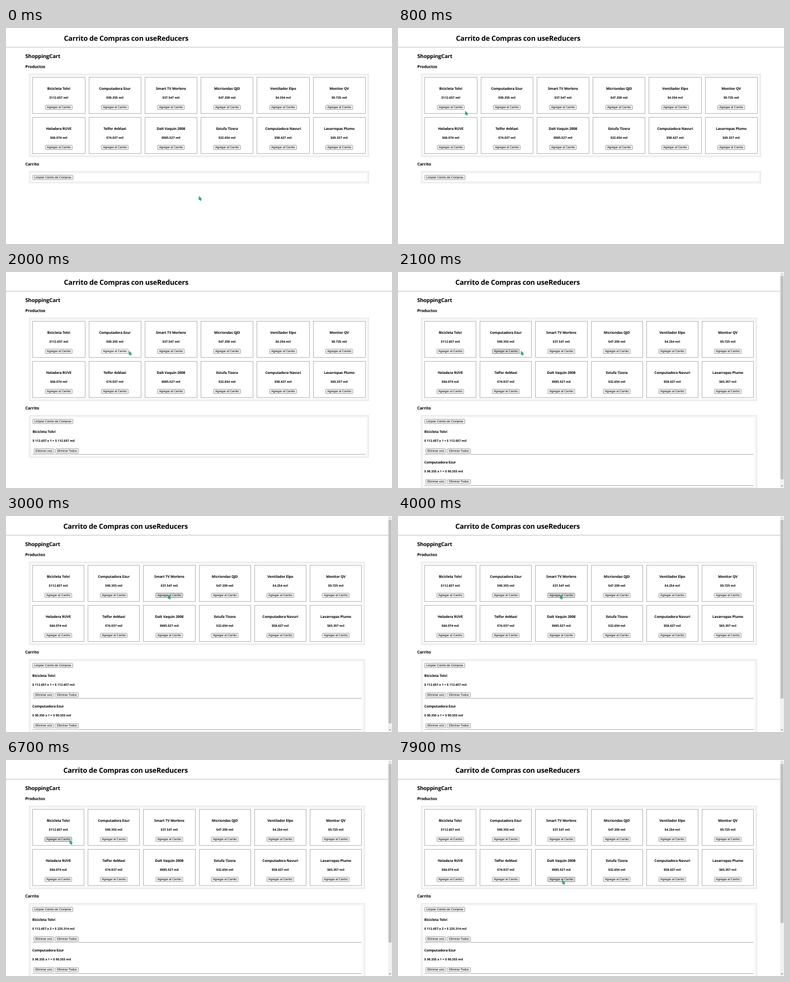
Animation of 690 by 388 pixels, one loop 8 s. Source, as an HTML page:

```html
<!DOCTYPE html>
<html lang="es">
<head>
<meta charset="utf-8">
<title>Carrito de Compras</title>
<style>
  html, body { margin: 0; width: 100%; height: 100%; overflow: hidden; background: #fff; }
  svg { display: block; width: 690px; height: 388px; }
  text { font-family: "Open Sans", "Noto Sans", sans-serif; font-weight: 700; fill: #000;
         letter-spacing: -.017em; text-rendering: geometricPrecision; }
  .h1 { font-size: 12.55px; }
  .h2 { font-size: 9.55px; }
  .h3 { font-size: 7.3px; }
  .h4 { font-size: 6.27px; }
  .h5 { font-size: 5.52px; letter-spacing: 0; }
  .mid { text-anchor: middle; }
  .btn { font: 400 5.39px "Liberation Sans", Arial, sans-serif; letter-spacing: 0; text-anchor: middle; }
</style>
</head>
<body>
<svg viewBox="0 0 690 388" xmlns="http://www.w3.org/2000/svg">
  <g id="page"></g>
  <path id="cursor" d="M0 0V6.3L1.5 5.2L2.6 7.4L3.9 6.8L2.9 4.7L4.8 4.4Z"
        fill="#1fbd91" stroke="#20705a" stroke-width=".6" stroke-linejoin="round"/>
</svg>
<script>
const LOOP = 8000, STEP = 100, ITEM_H = 55.3;
const products = [
  ["Bicicleta Tolvi", "112.657"], ["Computadora Ezur", "90.355"], ["Smart TV Morlens", "37.547"],
  ["Micriondas QJD", "47.359"], ["Ventilador Elpo", "4.254"], ["Monitor QV", "9.725"],
  ["Heladera RUVE", "66.074"], ["Telfor 4xMaxi", "74.037"], ["Dalt Vaquin 2008", "985.527"],
  ["Estufa Tizora", "22.654"], ["Computadora Navuri", "58.427"], ["Lavarropas Plumo", "65.357"]
];

// Mouse: time, x, y
const path = [
  [0, 345, 302.6], [900, 112.3, 144], [1000, 112.8, 144.2], [1300, 112.8, 144.2],
  [1700, 220, 142.3], [2100, 220, 142.3], [2600, 288, 143.6], [2800, 288, 143.6],
  [3000, 290, 142.2], [5500, 290, 142.2], [6100, 113.8, 144.3], [6600, 113.8, 144.3],
  [6700, 114.2, 144.5], [7000, 295, 217], [7400, 295, 217], [7500, 293.9, 216.3],
  [LOOP, 293.9, 216.3]
];
// Mouse button: down, up
const presses = [[1200, 1300], [2000, 2100], [3200, 3300], [4600, 4700],
                 [5400, 5600], [6400, 6500], [7700, 7800]];
const looks = {
  idle: ["#efefef", "#929292"],
  hover: ["#e3e3e3", "#6c6c6c"],
  down: ["#f5f5f5", "#a2a2a2"]
};

const page = document.getElementById("page");
const cursor = document.getElementById("cursor");

const text = (cls, x, y, s) => `<text class="${cls}" x="${x}" y="${y}">${s}</text>`;
const rect = (x, y, w, h, fill, extra = "") =>
  `<rect x="${x}" y="${y}" width="${w}" height="${h}" fill="${fill}" ${extra}/>`;

function outline(x, y, right, bottom, color) {
  const l = Math.round(x) + .5, t = Math.round(y) + .5;
  return rect(l, t, Math.round(right) - .5 - l, Math.round(bottom) - .5 - t, "none", `stroke="${color}"`);
}

function button(x, y, w, label, look = "idle") {
  const [fill, line] = looks[look];
  return rect(x + .4, y + .4, w - .8, 7.9, fill, `rx="1" stroke="${line}" stroke-width=".8"`) +
    text("btn", x + w / 2, y + 6.1, label);
}

// Panel whose grey edge fades inwards
function panel(x, y, right, bottom) {
  return ["#ebebeb", "#efefef", "#f3f3f3", "#f7f7f7", "#fbfbfb"]
    .map((c, i) => outline(x + i, y + i, right - i, bottom - i, c)).join("");
}

function cell(i, width) {
  const left = .05 * width + 12.9;
  const pitch = (width - 2 * left + 6.4) / 6;
  const x = left + (i % 6) * pitch, y = 88 + (i > 5 ? 72 : 0), w = pitch - 6.4;
  return { x, y, w, mid: x + w / 2 };
}

function card(i, width, look) {
  const { x, y, w, mid } = cell(i, width), [name, price] = products[i];
  return outline(x, y, x + w + .3, y + 66, "#b4b4b4") +
    text("h4 mid", mid, y + 22.9, name) +
    text("h5 mid", mid, y + 39.2, `$${price} mil`) +
    button(mid - 24.5, y + 50.2, 49, "Agregar al Carrito", look);
}

function cartItem(row, i, count, width) {
  const x = .05 * width + 12.9, y = 279 + row * ITEM_H, [name, price] = products[i];
  const total = (price * count).toFixed(3);
  return text("h4", x, y + 9.5, name) +
    text("h5", x, y + 25.9, `$ ${price} x ${count} = $ ${total} mil`) +
    button(x + 2.2, y + 38, 36.4, "Eliminar uno") +
    button(x + 40.6, y + 38, 42.2, "Eliminar Todos") +
    rect(x, Math.round(y + 48.4), width - 2 * x, 1, "#b0b0b0");
}

function scrollbar(rows) {
  const end = 6.9, track = 388 - 2 * end;
  const thumb = track * 388 / (286.5 + ITEM_H * rows);
  return rect(683, 0, 7, 388, "#f1f1f1") +
    rect(683.7, end, 5.6, thumb, "#c1c1c1") +
    `<path d="M684.9 4.4h3.2l-1.6-1.8z" fill="#a3a3a3"/><path d="M684.9 383.4h3.2l-1.6 1.8z" fill="#505050"/>`;
}

function cartAt(t) {
  const cart = [];
  if (t >= 1300) cart.push([0, t >= 6500 ? 2 : 1]);
  if (t >= 2100) cart.push([1, 1]);
  if (t >= 3300) cart.push([2, t >= 5600 ? 3 : t >= 4700 ? 2 : 1]);
  if (t >= 7800) cart.push([8, 1]);
  return cart;
}

function mouseAt(t) {
  const k = path.findIndex((p, i) => i && t <= p[0]);
  const [t0, x0, y0] = path[k - 1], [t1, x1, y1] = path[k];
  const u = (t - t0) / (t1 - t0), e = u * u * (3 - 2 * u);
  return [x0 + (x1 - x0) * e, y0 + (y1 - y0) * e];
}

function hovered(mx, my, width) {
  return products.findIndex((_, i) => {
    const { mid, y } = cell(i, width);
    return Math.abs(mx - mid) < 28 && my > y + 50 && my < y + 59;
  });
}

function draw(width, cart, over, look) {
  const x = .05 * width, edge = x + 6.5;
  page.innerHTML =
    text("h1", .15 * width, 22.5, "Carrito de Compras con useReducers") +
    rect(0, 34, width, 1, "#c0c0c0") +
    text("h2", x, 53.7, "ShoppingCart") +
    text("h3", x, 72.1, "Productos") +
    panel(edge, 82, width - edge, 232) +
    products.map((_, i) => card(i, width, i === over ? look : "idle")).join("") +
    text("h3", x, 247.3, "Carrito") +
    panel(edge, 257, width - edge, 279 + ITEM_H * cart.length) +
    button(x + 12.9, 264, 72.8, "Limpiar Carrito de Compras") +
    cart.map(([i, n], row) => cartItem(row, i, n, width)).join("") +
    (width < 690 ? scrollbar(cart.length) : "");
}

let lastKey = "";
function render(ms) {
  const t = Math.floor((ms % LOOP) / STEP) * STEP;
  const cart = cartAt(t), width = cart.length > 1 ? 683 : 690;
  const [mx, my] = mouseAt(t);
  const over = hovered(mx, my, width);
  const look = presses.some(([a, b]) => t >= a && t < b) ? "down" : "hover";
  const key = [cart.join(), over, look].join("|");
  if (key !== lastKey) {
    draw(width, cart, over, look);
    lastKey = key;
  }
  cursor.setAttribute("transform", `translate(${mx} ${my})`);
}

let start;
function tick(now) {
  start ??= now;
  render(now - start);
  requestAnimationFrame(tick);
}
render(0);
requestAnimationFrame(tick);
</script>
</body>
</html>
```
